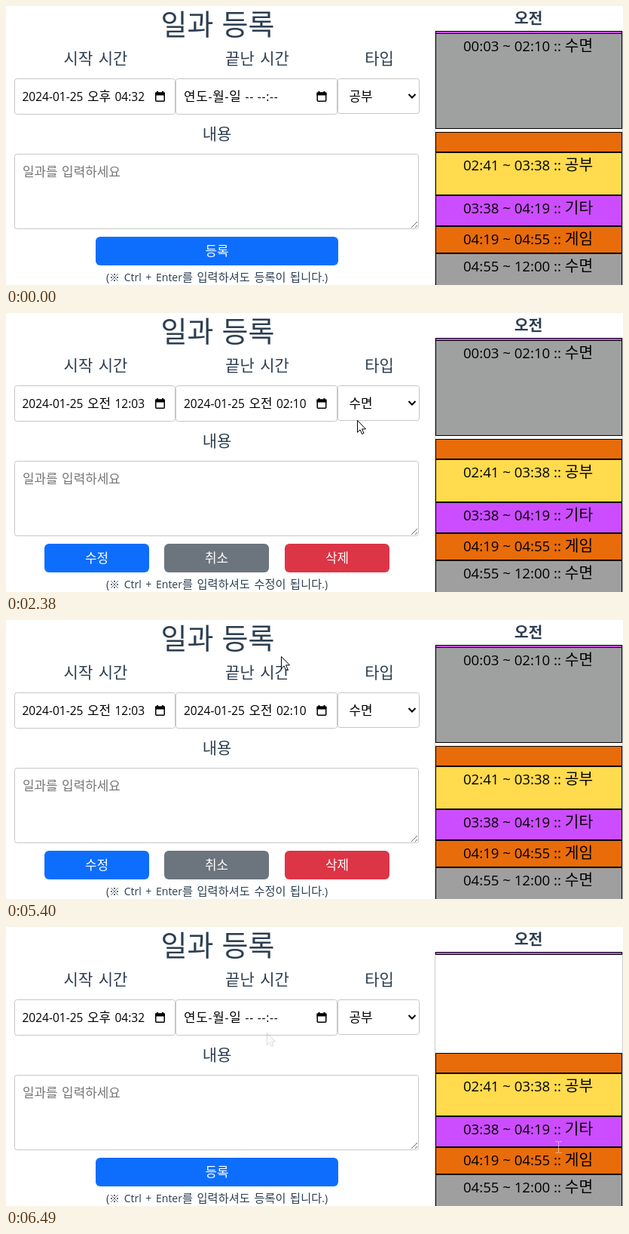
These frames come from a looping animation (819x370 px, 6.88 s). An HTML page:

```html
<!DOCTYPE html>
<html lang="ko">
<head>
<meta charset="utf-8">
<title>일과 등록</title>
<style>
html, body { margin: 0; width: 100%; height: 100%; overflow: hidden; background: #fff; }
svg { display: block; font-family: "Open Sans", "Noto Sans CJK KR", "Noto Sans CJK", sans-serif; }
</style>
</head>
<body>
<svg id="stage" width="819" height="370" viewBox="0 0 819 370"></svg>
<script>
const LOOP = 6880, START = 740, TICK = 77.57;
const INK = '#2c3e50';

// Schedule rows: top, bottom, colour, label, type
const rows = [
  [33, 37, '#cc4dff', '', '기타'],
  [36, 163, '#9fa1a0', '00:03 ~ 02:10 :: 수면', '수면'],
  [167, 194, '#e86c0a', '', '게임'],
  [194, 251, '#ffdb4d', '02:41 ~ 03:38 :: 공부', '공부'],
  [251, 292, '#cc4dff', '03:38 ~ 04:19 :: 기타', '기타'],
  [292, 328, '#e86c0a', '04:19 ~ 04:55 :: 게임', '게임'],
  [328, 380, '#9f9f9f', '04:55 ~ 12:00 :: 수면', '수면'],
];

// Pointer track: tick, x, y
const track = [
  [0, 680, 338], [4, 684, 190], [7, 690, 84], [8, 691, 80], [14, 691, 80],
  [17, 590, 98], [20, 475, 128], [21, 466, 142], [26, 447, 318], [29, 446, 332],
  [31, 446, 332], [33, 442, 298], [36, 438, 315], [38, 438, 315], [41, 628, 18],
  [42, 680, -40], [57, 372, -40], [58, 371, 2], [60, 365, 48], [62, 346, 140],
  [63, 346, 140], [66, 726, 233], [67, 733, 285], [71, 733, 285], [72, 760, 345], [73, 800, 362],
];
// Darkness of the delete button: tick, amount
const shade = [[25, 0], [27, 1], [32, 1], [33, .5], [34, .5], [35, 1], [51, 1], [53, 0]];

function at(keys, n, i = 1) {
  const k = keys.findIndex(key => key[0] >= n);
  if (k < 0) return keys[keys.length - 1][i];
  if (!k) return keys[0][i];
  const a = keys[k - 1], b = keys[k];
  return a[i] + (b[i] - a[i]) * (n - a[0]) / (b[0] - a[0]);
}

// Hangul is set slightly larger than the Latin text beside it
const text = (x, y, size, s, fill = '#000', more = '') =>
  `<text x="${x}" y="${y}" font-size="${size}" fill="${fill}" ${more}>` +
  s.replace(/[가-힣]+/g, `<tspan font-size="${size * 1.09}">$&</tspan>`) + '</text>';
const mid = (x, y, size, s, fill, more = '') => text(x, y, size, s, fill, 'text-anchor="middle" ' + more);
const rect = (x, y, w, h, r, fill, stroke = 'none') =>
  `<rect x="${x}" y="${y}" width="${w}" height="${h}" rx="${r}" fill="${fill}" stroke="${stroke}"/>`;
const path = (d, more) => `<path d="${d}" ${more}/>`;
const field = (x, y, w, h) => rect(x + .5, y + .5, w - 1, h - 1, 3, '#fff', '#c6c6c6');
const button = (x, w, s, fill) => rect(x, 306, w, 38, 6, fill) + mid(x + w / 2, 331, 15.5, s, '#fff');
const calendar = x =>
  rect(x + .75, 115.25, 11.5, 11, 1, 'none', '#000" stroke-width="1.5') +
  path(`M${x} 114.5h13v4h-13zM${x + 2} 113h2v2h-2zM${x + 9} 113h2v2h-2z`, '');
const date = (x, s) => text(x, 125.5, 15.5, s, '#000',
  s[0] === '2' ? 'word-spacing="1.5"' : 'letter-spacing=".75"');
const arrow = (x, y, opacity) => path('M.5 .5V16.3L4.1 12.9 6.6 18.6 9 17.5 6.6 11.9H11.5Z',
  `transform="translate(${x} ${y})" fill="#fff" stroke="#000" opacity="${opacity}"`);

function form(edit, dark) {
  const verb = edit ? '수정' : '등록';
  const red = [220 - 44 * dark, 53 - 11 * dark, 69 - 14 * dark].map(Math.round);
  return mid(281, 37.5, 34.9, '일과 등록', INK, 'font-weight="300" word-spacing="2"') +
    [[119, 77, '시작 시간'], [333.5, 77, '끝난 시간'], [495.5, 77, '타입'], [280, 177, '내용']]
      .map(([x, y, s]) => mid(x, y, 19.3, s, INK, 'font-weight="300" word-spacing="2.5"')).join('') +
    field(11, 96, 214, 48) + field(225, 96, 215, 48) + field(440, 96, 109, 47) +
    date(21.5, edit ? '2024-01-25 오전 12:03' : '2024-01-25 오후 04:32') +
    date(236, edit ? '2024-01-25 오전 02:10' : '연도-월-일 -- --:--') +
    text(455.5, 125.5, 15.5, edit ? '수면' : '공부') +
    calendar(198) + calendar(412.5) +
    path('M534.5 117l4.5 4.5 4.5-4.5', 'fill="none" stroke="#000" stroke-width="2"') +
    field(11, 196, 537, 100) +
    path('M538 294l8-8M543 294l3-3', 'stroke="#666"') +
    text(22, 226, 15.5, '일과를 입력하세요', '#757575', 'word-spacing="1.5"') +
    (edit
      ? button(51, 139, '수정', '#0d6efd') + button(210, 139, '취소', '#6c757d') + button(370, 139, '삭제', `rgb(${red})`)
      : button(119, 322, '등록', '#0d6efd')) +
    mid(280, 364.5, 14, `(※ Ctrl + Enter를 입력하셔도 ${verb}이 됩니다.)`, INK, 'word-spacing="2"');
}

function schedule(removed) {
  return mid(693.5, 24, 18.8, '오전', INK, 'font-weight="700"') +
    path('M569.5 33V370M818.5 33V370', 'stroke="#ccc"') +
    rows.map(([top, bottom, fill, s], i) => removed && i === 1 ? '' :
      rect(570.5, top + .5, 247, bottom - top - 1, 0, fill, '#000') +
      mid(693, top + 23.5, 18.6, s)).join('');
}

const tooltip = ([top, , , , type]) =>
  rect(378, top - 5, 180, 41, 6, '#000') +
  path(`M557 ${top + 9.5}l6.5 6-6.5 6z`, '') +
  mid(468, top + 22.5, 18.8, type, '#fff');

function draw(n) {
  const x = at(track, n, 1), y = at(track, n, 2);
  const removed = n >= 63, beam = n >= 67;
  const hovering = x >= 570 && (n >= 0 && n < 20 || [67, 68, 72, 73].includes(n));
  const row = hovering && rows.find(r => y >= r[0] && y < r[1]);
  let out = form(n >= 12 && !removed, at(shade, n)) + schedule(removed);
  if (row) out += tooltip(row);
  if (n >= 64) out += arrow(346, 140, .15);
  if (beam) out += path('M729.5 284.5h3l1 1 1-1h3M733.5 285v14M729.5 299.5h3l1-1 1 1h3',
    `fill="none" opacity=".6" stroke="${n < 69 ? '#444' : '#eee'}"`);
  if (n >= 0 && n < 74 && !(beam && n < 72)) out += arrow(x, y, 1);
  stage.innerHTML = out;
}

const stage = document.getElementById('stage');
const begin = performance.now();
let shown;
function frame() {
  const t = (performance.now() - begin) % LOOP;
  const n = Math.floor((t - START) / TICK);
  if (n !== shown) draw(shown = n);
  requestAnimationFrame(frame);
}
frame();
</script>
</body>
</html>
```
